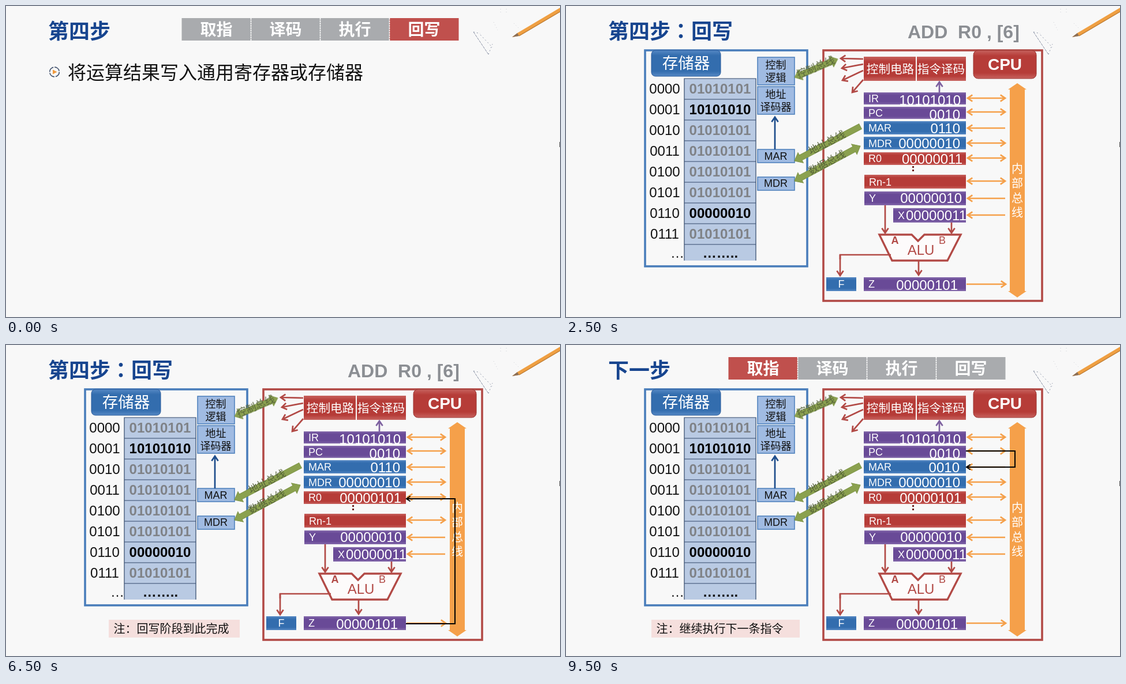
These frames come from a looping animation (960x540 px, 10 s). An HTML page:

```html
<!DOCTYPE html>
<html lang="zh-CN">
<head>
<meta charset="utf-8">
<title>第四步：回写</title>
<style>
html, body { margin: 0; width: 100%; height: 100%; overflow: hidden; background: #f8f8f8; }
svg { display: block; width: 960px; height: 540px; }
text { font-family: "Liberation Sans", "Noto Sans CJK SC", sans-serif; white-space: pre; }
.title { font-weight: 700; font-size: 36px; fill: #17458f; }
.wide { font-family: "Noto Sans CJK JP", sans-serif; }

/* Stepped timeline, 10 s per loop */
.timed { animation: 10s step-end infinite; }
#diagram { animation-name: diagram; }
#head2 { animation-name: until70; }
#head3, #note3 { animation-name: from70; }
#loop2 { animation-name: loop2; }
#loop3 { animation-name: from75; }
#note2 { animation-name: note2; }
#r0Old { animation-name: until50; }
#r0New { animation-name: from55; }
#marOld { animation-name: until75; }
#marNew { animation-name: from85; }
@keyframes diagram { 0% { opacity: 0 } 10% { opacity: .55 } 15%, 100% { opacity: 1 } }
@keyframes until50 { 0% { opacity: 1 } 50%, 100% { opacity: 0 } }
@keyframes until70 { 0% { opacity: 1 } 70%, 100% { opacity: 0 } }
@keyframes until75 { 0% { opacity: 1 } 75%, 100% { opacity: 0 } }
@keyframes from55 { 0% { opacity: 0 } 55%, 100% { opacity: 1 } }
@keyframes from70 { 0% { opacity: 0 } 70%, 100% { opacity: 1 } }
@keyframes from75 { 0% { opacity: 0 } 75%, 100% { opacity: 1 } }
@keyframes from85 { 0% { opacity: 0 } 85%, 100% { opacity: 1 } }
@keyframes loop2 { 0% { opacity: 0 } 30% { opacity: 1 } 70%, 100% { opacity: 0 } }
@keyframes note2 { 0% { opacity: 0 } 60% { opacity: 1 } 70%, 100% { opacity: 0 } }
</style>
</head>
<body>
<svg id="stage" viewBox="0 0 960 540"></svg>
<script>
const RED = '#b24a46', BLUE = '#4a7ebb', ORANGE = '#f5a04a', GREEN = '#8ba14f';

const rect = (x, y, x2, y2, fill, extra = '') =>
  `<rect x="${x}" y="${y}" width="${x2 - x}" height="${y2 - y}" fill="${fill}" ${extra}/>`;

const text = (x, y, size, fill, str, extra = '') =>
  `<text x="${x}" y="${y}" font-size="${size}" fill="${fill}" ${extra}>${str}</text>`;

const MID = 'text-anchor="middle" ', END = 'text-anchor="end" ', BOLD = 'font-weight="700" ';

const line = (d, color, width = 2.7) =>
  `<path d="${d}" fill="none" stroke="${color}" stroke-width="${width}"/>`;

const group = (id, ...parts) => `<g id="${id}" class="timed">${parts.join('')}</g>`;

// Open V arrowhead at (x, y), pointing along angle a
function tip(x, y, a, size) {
  const leg = s => `${x - size * Math.cos(a + s)} ${y - size * Math.sin(a + s)}`;
  return `M${leg(.6)}L${x} ${y}L${leg(-.6)}`;
}

function arrow(x1, y1, x2, y2, color, { both = false, width = 2.7, size = 10 } = {}) {
  const a = Math.atan2(y2 - y1, x2 - x1);
  const back = both ? tip(x1, y1, a + Math.PI, size) : '';
  return line(`M${x1} ${y1}L${x2} ${y2}` + tip(x2, y2, a, size) + back, color, width);
}

// Solid block arrow with its label along the shaft
function bus(x1, y1, x2, y2, label, both) {
  const len = Math.hypot(x2 - x1, y2 - y1);
  const deg = Math.atan2(y2 - y1, x2 - x1) * 180 / Math.PI;
  const end = both ? `L${len - 12} 5V10L${len} 0L${len - 12} -10V-5` : `L${len} 5V-5`;
  return `<g transform="translate(${x1} ${y1}) rotate(${deg})">
    <path d="M0 0L12 10V5${end}H12V-10Z" fill="${GREEN}" stroke="#7d9446"/>
    ${text(len / 2, 4, 17.5, '#566339', label, MID)}</g>`;
}

function tabs(x0, active) {
  return ['取指', '译码', '执行', '回写'].map((name, i) => {
    const x = x0 + i * 120;
    const edge = i ? `<path d="M${x} 21V60" stroke="#fff" stroke-width="1.5" stroke-dasharray="3 1"/>` : '';
    return rect(x, 21, x + 120, 60, i === active ? '#c0504d' : '#a9abae') + edge +
      text(x + 60, 51, 28, '#fff', name, MID + BOLD);
  }).join('');
}

const title = str => `<text x="73" y="57" class="title">${str}</text>`;

const stationery = `
  <path d="M877 54L886 47L960 3V10L889 52Z" fill="#ef9f42"/>
  <path d="M889 52L960 10" stroke="#b9772f" stroke-width="1.2"/>
  <path d="M877 54L886 47L889 52Z" fill="#8a6f58"/>
  <g fill="none" stroke="#8b93a6" stroke-width="1">
    <path d="M810 45L836 84" stroke-dasharray="5 1"/>
    <path d="M810 45L822 48M822 50L843 72M836 84L843 66" stroke-dasharray="2 4"/>
    <path d="M857 5V14M867 5V12M845 28L852 42M880 30L888 38" stroke="#c9ccd2" stroke-dasharray="1 4"/>
  </g>
  <path d="M959.5 236V245" stroke="#555"/>`;

function memory() {
  const rows = ['01010101', '10101010', '01010101', '01010101', '01010101', '01010101', '00000010', '01010101'];
  const cells = rows.map((bits, i) => {
    const y = 126 + i * 36;
    const ink = bits === '01010101' ? '#7f8287' : '#000';
    return text(171, y + 26, 24, '#111', i.toString(2).padStart(4, '0'), MID) +
      text(267, y + 26, 24, ink, bits, MID + BOLD) +
      line(`M205 ${y + 36}H329`, '#33496b', 1.2);
  }).join('');
  const chip = (y, y2, ...lines) =>
    rect(332, y, 396, y2, '#a0bbe2', `stroke="${BLUE}" stroke-width="1.5"`) +
    lines.map(([str, base]) => text(363.5, base, 18, '#111', str, MID)).join('');
  return rect(137, 77, 418, 452, '#f8f8f8', `stroke="${BLUE}" stroke-width="3.6"`) +
    rect(205, 126, 329, 442, '#b9cae3') +
    line('M205 442V126H329V442', '#33496b', 1.2) + cells +
    text(181, 437, 24, '#111', '…') + text(267.5, 437, 24, '#111', '……..', MID + BOLD) +
    rect(148, 77, 268, 122, 'url(#blue)', 'rx="7" stroke="#2b5c9c"') +
    text(208, 109, 27.5, '#fff', '存储器', MID) +
    chip(89, 137, ['控制', 109], ['逻辑', 131]) +
    chip(140, 188, ['地址', 160], ['译码器', 182]) +
    chip(249, 272, ['MAR', 267]) + chip(297, 320, ['MDR', 314]) +
    arrow(362, 249, 362, 193, '#1f4e8c');
}

// One register: box, name and right-aligned value
function reg(x, y, y2, color, name, nameY, value = '', right = 0, valueY = 0) {
  return rect(x, y, 693, y2, `url(#${color})`) +
    text(x + 8, nameY, 18, '#fff', name) + digits(value, right, valueY);
}

function digits(value, right, y) {
  return value && text(right, y, 24, '#fff', value, END);
}

function cpu() {
  const wire = (y, both) => arrow(761, y, 696, y, ORANGE, { both });
  return rect(446, 77, 825, 512, '#f8f8f8', `stroke="${RED}" stroke-width="3.6"`) +
    rect(516, 88, 606, 130, 'url(#red)') + rect(608, 88, 693, 130, 'url(#red)') +
    text(562, 117, 20.6, '#fff', '控制电路', MID) + text(650, 117, 20.6, '#fff', '指令译码', MID) +
    rect(706, 77, 815, 126, 'url(#red)', 'rx="8" stroke="#9c3835"') +
    text(760.5, 111, 28, '#fff', 'CPU', MID + BOLD) +
    arrow(515, 92, 476, 91, RED) + arrow(515, 101, 478, 108, RED) +
    arrow(515, 112, 479, 129, RED) + arrow(515, 128, 496, 150, RED) +
    arrow(647, 150, 647, 132, '#7d60a0') +
    reg(516, 150, 171, 'purple', 'IR', 167, '10101010', 684, 172) +
    reg(516, 175, 196, 'purple', 'PC', 192, '0010', 683, 197) +
    reg(516, 200, 223, 'blue', 'MAR', 218) +
    reg(516, 227, 249, 'blue', 'MDR', 245, '00000010', 683, 247) +
    reg(516, 254, 276, 'red', 'R0', 271) +
    reg(517, 293, 317, 'red', 'Rn-1', 312) +
    reg(517, 322, 346, 'purple', 'Y', 340, '00000010', 686, 342) +
    reg(567, 351, 376, 'purple', 'X', 370, '00000011', 694, 372) +
    reg(516, 471, 495, 'purple', 'Z', 489, '00000101', 679, 493) +
    rect(451, 471, 503, 495, 'url(#blue)') + text(477, 489, 18, '#fff', 'F', MID) +
    group('marOld', digits('0110', 683, 221)) + group('marNew', digits('0010', 682, 221)) +
    group('r0Old', digits('00000011', 687, 274)) + group('r0New', digits('00000101', 685, 274)) +
    [279, 285].map(y => rect(600, y - 1, 603, y + 2, '#6b1f1d')).join('') +
    [160, 184, 238, 264, 304].map(y => wire(y, true)).join('') +
    [212, 334, 363].map(y => wire(y)).join('') + arrow(694, 483, 762, 483, ORANGE) +
    `<path d="M782 134L798 145H795V495H798L782 506L766 495H769V145H766Z" fill="${ORANGE}"/>` +
    [...'内部总线'].map((c, i) => text(782, 290 + i * 25.3, 20, '#fff', c, MID)).join('') +
    arrow(553, 346, 553, 394, RED) + arrow(668, 376, 668, 394, RED) +
    `<path d="M543 397H599L610 408L621 397H684L661 442H565Z" fill="#fdfbfb" stroke="${RED}" stroke-width="3.4"/>` +
    text(570, 413, 18, RED, 'A', MID + BOLD) + text(652, 413, 18, RED, 'B', MID) +
    text(615, 432, 24, RED, 'ALU', MID) +
    line('M563 432H475V440', RED) + arrow(475, 432, 475, 468, RED) +
    arrow(611, 442, 611, 467, RED);
}

const loop = (from, to) =>
  line(`M693 ${from}H778V${to}H694` + tip(694, to, Math.PI, 8), '#000', 2);

const note = (x, str) =>
  rect(x, 477, 405, 508, '#f5dfdd') + text(x + 8.5, 499.5, 20, '#111', str);

// Bevelled fill: light rim above and below a flat body
const bevel = (id, rim, body) =>
  `<linearGradient id="${id}" x2="0" y2="1"><stop stop-color="${rim}"/><stop offset=".2" stop-color="${body}"/>
   <stop offset=".8" stop-color="${body}"/><stop offset="1" stop-color="${rim}"/></linearGradient>`;

const opening = title('第四步') + tabs(304.5, 3) +
  `<circle cx="84" cy="114.5" r="8.3" fill="none" stroke="#44546f" stroke-width="1.8" stroke-dasharray="11 2"/>
   <path d="M81 110.5L88.5 114.5L81 118.5Z" fill="#f09a3e"/>` +
  text(107, 127, 32, '#111', '将运算结果写入通用寄存器或存储器');

document.getElementById('stage').innerHTML =
  `<defs>${bevel('blue', '#5588c4', '#336dae')}${bevel('red', '#c7625e', '#b63c38')}${bevel('purple', '#8469ab', '#694a97')}</defs>` +
  rect(0, 0, 960, 540, '#f8f8f8') + opening +
  group('diagram',
    rect(0, 0, 960, 540, '#f8f8f8'),
    group('head2',
      title('第四步<tspan class="wide" lang="ja">：</tspan>回写'),
      text(592, 56, 32, '#8b8e93', 'ADD  R0 , [6]', BOLD + 'xml:space="preserve"')),
    group('head3', title('下一步'), tabs(281.5, 0)),
    memory(), cpu(),
    bus(396, 124, 471, 92, '控制总线', true),
    bus(396, 269, 510, 209, '地址总线', false),
    bus(396, 304, 510, 243, '数据总线', true),
    group('loop2', loop(484, 267)), group('loop3', loop(184, 212)),
    group('note2', note(178, '注：回写阶段到此完成')),
    group('note3', note(148, '注：继续执行下一条指令'))) +
  stationery;
</script>
</body>
</html>
```
